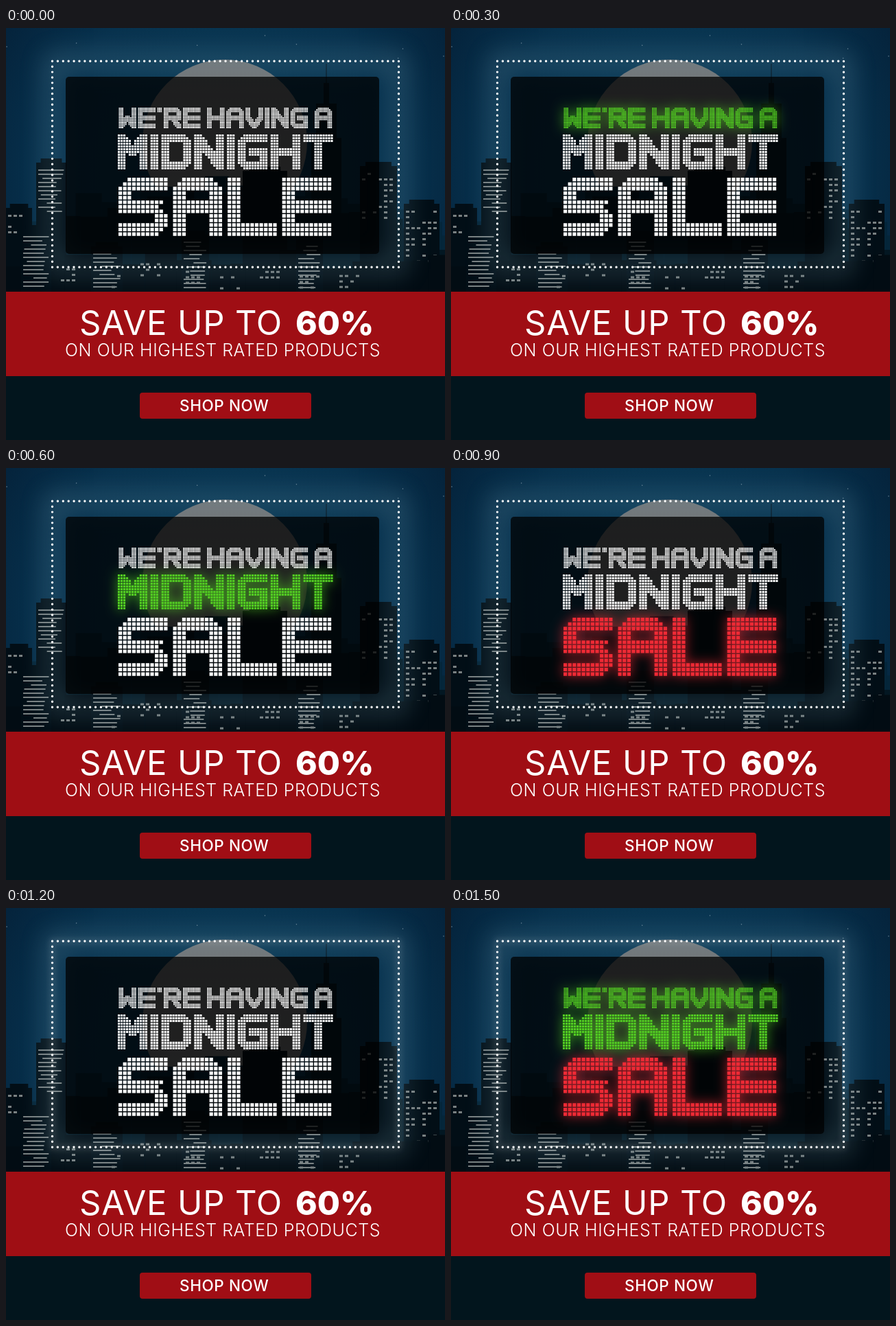
An HTML page with a canvas for the animation above (1.8 s loop, 640 by 600 pixels).

```html
<!DOCTYPE html>
<html lang="en">
<head>
<meta charset="utf-8">
<title>Midnight sale</title>
<style>
html, body { margin: 0; width: 640px; height: 600px; overflow: hidden; background: #02151d; }
canvas { display: block; }
</style>
</head>
<body>
<canvas id="stage" width="640" height="600"></canvas>
<script>
const ctx = document.getElementById('stage').getContext('2d');
const STEP = 300, STEPS = 6, GROUND = 384;
const GREEN = '#52cc22', RED = '#ee2a35', WINDOW = '#7a8081';

// Pen paths over a 3 x 3 grid of nodes (0-8, row by row); corners after the slash are cut.
const GLYPHS = {
  A: '6028 35/02', D: '02860/28', E: '2068 35', G: '206854/06', H: '06 28 35',
  I: '06', L: '068', M: '60428', N: '6082', R: '60253 48/2', S: '203586/058',
  T: '02 17', V: '03752', W: '06482', "'": '0'
};
const COLS = 11, PEN = 3;
const node = n => [n % 3 * 4, Math.floor(n / 3) * 5];

function lamps(char) {
  const [paths, cuts = ''] = GLYPHS[char].split('/');
  const cells = new Set();
  for (const path of paths.split(' ')) {
    for (let i = 0; i < path.length; i++) {
      const [x0, y0] = node(path[Math.max(0, i - 1)]), [x1, y1] = node(path[i]);
      const n = Math.max(Math.abs(x1 - x0), Math.abs(y1 - y0), 1);
      for (let k = 0; k <= n; k++) {
        const x = Math.round(x0 + (x1 - x0) * k / n), y = Math.round(y0 + (y1 - y0) * k / n);
        for (let p = 0; p < PEN * PEN; p++)
          cells.add((y + Math.floor(p / PEN)) * COLS + x + p % PEN);
      }
    }
  }
  const corners = [...cuts].map(n => [n % 3 * 5, Math.floor(n / 3) * 6]);
  return [...cells].map(n => [n % COLS, Math.floor(n / COLS)])
    .filter(([x, y]) => corners.every(([u, v]) => Math.abs(x - u) + Math.abs(y - v) > 1));
}

function makeLine(text, x, y, pitch, color, ...litSteps) {
  const path = new Path2D();
  for (const char of text) {
    let width = 2;
    if (char !== ' ') {
      const cells = lamps(char);
      for (const [c, r] of cells)
        path.rect(x + c * pitch, y + r * pitch, pitch * .78, pitch * .78);
      width = Math.max(...cells.map(cell => cell[0])) + 1;
    }
    x += (width + 1) * pitch;
  }
  return { path, color, litSteps };
}

const lines = [
  makeLine("WE'RE HAVING A", 164.5, 116, 2.34, GREEN, 1, 5),
  makeLine('MIDNIGHT', 163, 155, 3.98, GREEN, 2, 5),
  makeLine('SALE', 164, 218, 6.63, RED, 3, 5)
];

function random(seed) {
  return () => (seed = seed * 16807 % 2147483647) / 2147483647;
}

function box(color, x, y, w, h, radius = 0) {
  ctx.fillStyle = color;
  ctx.beginPath();
  ctx.roundRect(x, y, w, h, radius);
  ctx.fill();
}

function glow(color, blur) {
  ctx.shadowColor = color;
  ctx.shadowBlur = blur;
}

function sky(rand) {
  const g = ctx.createRadialGradient(320, 210, 60, 320, 210, 400);
  g.addColorStop(0, '#0a3b57');
  g.addColorStop(.6, '#07314d');
  g.addColorStop(1, '#042139');
  box(g, 0, 0, 640, GROUND);
  for (let i = 0; i < 8; i++) box('#6d8799', rand() * 640, rand() * 44, 1.5, 1.5, 1);
  const moon = ctx.createLinearGradient(0, 45, 0, 285);
  moon.addColorStop(0, '#6f7274');
  moon.addColorStop(1, '#848484');
  box(moon, 199, 46, 240, 240, 120);
}

// A row of random blocks that rises towards the middle.
function skyline(rand, color, base, rise) {
  for (let x = -10; x < 640;) {
    const w = 22 + rand() * 34;
    const top = base - rise * Math.sin(Math.PI * (x + w / 2) / 640) + rand() * 30;
    box(color, x, top, w, GROUND - top);
    x += w;
  }
}

function stripes(rand, x, y, w, h) {
  for (let v = y; v < y + h; v += 6) {
    const start = rand() < .4 ? rand() * w * .45 : 0;
    box(WINDOW, x + start, v, (w - start) * (.65 + rand() * .35), 2);
  }
}

function panes(rand, x, y, w, h) {
  for (let v = y; v < y + h; v += 8)
    for (let u = x; u < x + w - 4; u += 8)
      if (rand() < .4) box(WINDOW, u, v, 5, 3);
}

function tower(rand, x, top, w, windows, depth = GROUND - top - 16) {
  box('#020e16', x, top, w, GROUND - top);
  box('#020e16', x + w * .15, top - 6, w * .7, 6);
  if (windows) windows(rand, x + 3, top + 10, w - 6, depth);
}

function city(rand) {
  skyline(rand, '#05263a', 270, 60);
  for (const [w, top] of [[1.5, 52], [8, 80], [30, 110], [44, 160]])
    box('#041a28', 467 - w / 2, top, w, GROUND - top);
  skyline(rand, '#031722', 300, 70);
  tower(rand, 345, 208, 65);
  tower(rand, 44, 196, 44, stripes, 66);
  tower(rand, 516, 201, 54, panes, 65);
  tower(rand, 0, 262, 38, panes, 28);
  tower(rand, 580, 256, 52, panes);
  skyline(rand, '#020c13', 330, 10);
  for (const [x, top, w] of [[22, 293, 44], [124, 318, 46], [256, 301, 40], [423, 307, 39]])
    tower(rand, x, top, w, stripes);
  for (let x = 80; x < 520; x += 58) panes(rand, x, 338 + rand() * 26, 30, 18);
}

function label(text, x, y, size, weight, spacing) {
  ctx.font = `${weight} ${size}px Inter, Lato, sans-serif`;
  ctx.letterSpacing = spacing + 'px';
  ctx.fillStyle = '#fff';
  ctx.fillText(text, x, y);
}

function offer() {
  box('#9f0e14', 0, GROUND, 640, 123);
  box('#02151d', 0, 507, 640, 93);
  box('#a00e15', 195, 531, 250, 38, 4);
  label('SAVE UP TO', 107, 447, 49, 400, .8);
  label('60%', 422, 447, 48, 800, 0);
  label('ON OUR HIGHEST RATED PRODUCTS', 86, 478, 25, 300, .55);
  label('SHOP NOW', 253, 558, 22.5, 500, .6);
}

function frameHaze() {
  ctx.save();
  ctx.lineWidth = 18;
  ctx.shadowOffsetX = 1000; // only the blurred shadow lands on the stage
  glow('rgba(130,180,200,.32)', 36);
  ctx.strokeRect(-933, 48, 506, 300);
  ctx.restore();
}

function sign(step) {
  frameHaze();
  box('rgba(0,0,0,.74)', 87, 71, 457, 258, 5);

  ctx.save();
  ctx.strokeStyle = '#fff';
  ctx.lineWidth = 3.4;
  ctx.lineCap = 'round';
  ctx.setLineDash([0, 1610 / 204]);
  if (step >= 4) glow('rgba(255,255,255,.8)', 10);
  ctx.strokeRect(67.5, 48.3, 505, 300);
  ctx.restore();

  for (const { path, color, litSteps } of lines) {
    const lit = litSteps.includes(step);
    ctx.save();
    ctx.fillStyle = lit ? color : '#fff';
    if (lit) glow(color, 17);
    ctx.fill(path);
    ctx.restore();
  }
}

let shown = -1;
function frame() {
  const step = Math.floor(performance.now() / STEP) % STEPS;
  if (step !== shown) {
    shown = step;
    const rand = random(73);
    sky(rand);
    city(rand);
    sign(step);
    offer();
  }
  requestAnimationFrame(frame);
}
frame();
</script>
</body>
</html>
```
